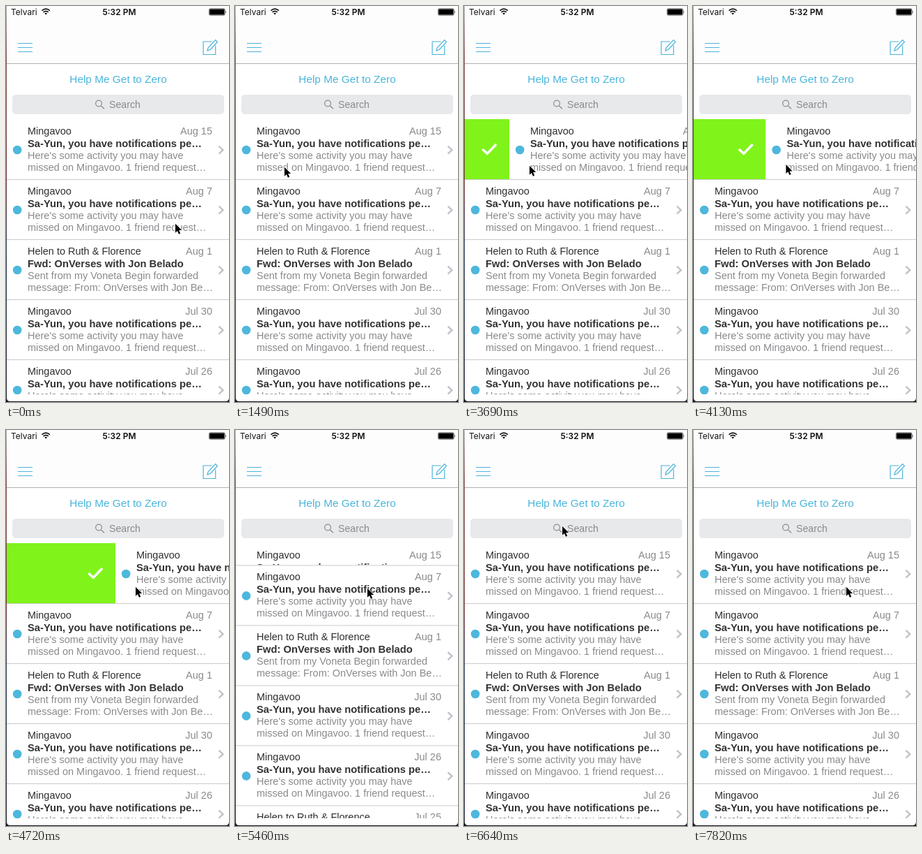
These frames come from a looping animation (320 by 567 pixels, 8000 ms). An HTML page:

```html
<!DOCTYPE html>
<html lang="en">
<head>
<meta charset="utf-8">
<title>Inbox swipe</title>
<style>
  html, body { margin: 0; width: 100%; height: 100%; overflow: hidden; background: #fff; }
  svg { display: block; width: 100%; height: 100%; }
  text { font: 14.5px "Liberation Sans", Arial, sans-serif; fill: #8a8a8e; }
  .status { font: 12px Inter, sans-serif; fill: #111; }
  .time { font-weight: 600; }
  .from { fill: #2e2e30; }
  .subject { font-size: 14.75px; font-weight: bold; fill: #333; }
  .help { font-size: 15.4px; fill: #4ab5da; }
  .line { fill: none; stroke: #4ab5da; stroke-width: 1.2; }
</style>
</head>
<body>
<svg viewBox="0 0 320 567" preserveAspectRatio="none">
  <defs>
    <linearGradient id="edge" x1="0" y1="0" x2="0" y2="1">
      <stop offset="0" stop-color="#a9adb5"/>
      <stop offset=".13" stop-color="#7c4a48"/>
      <stop offset=".45" stop-color="#6b3034"/>
      <stop offset=".6" stop-color="#26344e"/>
      <stop offset="1" stop-color="#10151f"/>
    </linearGradient>
    <clipPath id="listArea"><rect x="1" y="162" width="319" height="394"/></clipPath>
  </defs>

  <rect width="320" height="567" fill="url(#edge)"/>
  <path d="M1 0H320V561Q320 566 315 566H6Q1 566 1 561Z" fill="#fff"/>
  <rect x="1" width="319" height="82" fill="#fdfdfd"/>
  <rect x="1" y="82" width="319" height="1" fill="#b0b0b2"/>

  <!-- status bar -->
  <text class="status" x="7" y="12.5">Telvari</text>
  <g fill="none" stroke="#111" stroke-width="1.7">
    <path d="M51.5 6.6Q57.2 1.6 62.9 6.6M53.6 8.9Q57.2 5.7 60.8 8.9"/>
    <path d="M57.2 12.6L55.3 10.5Q57.2 9 59.1 10.5Z" fill="#111" stroke="none"/>
  </g>
  <text class="status time" x="162.5" y="12.5" text-anchor="middle">5:32 PM</text>
  <rect x="291.4" y="3.8" width="22.8" height="9.4" rx="1.8" fill="none" stroke="#000" stroke-width=".6"/>
  <rect x="292.2" y="4.6" width="21.2" height="7.8" rx="1" fill="#000"/>
  <path d="M315 7Q316.6 8.5 315 10Z" fill="#000"/>

  <!-- navigation -->
  <path class="line" style="stroke-width:1" d="M17 53.5H38M17 59.5H38M17 65.5H38"/>
  <path class="line" d="M295.5 51H283.1V69.5H300.7V56.5"/>
  <path class="line" d="M289 64L290.1 59.8L300.7 48.7L303.5 51.5L293.1 62.5Z"/>
  <text class="help" x="161" y="110" text-anchor="middle">Help Me Get to Zero</text>
  <rect x="9" y="127" width="304" height="28" rx="5" fill="#e8e9eb"/>
  <path d="M137.5 139.5a4.4 4.4 0 1 1-8.8 0a4.4 4.4 0 1 1 8.8 0M136.3 142.8L141 147.2"
        fill="none" stroke="#8a8a8e" stroke-width="1.2"/>
  <text x="148" y="146" style="font-size:14.2px">Search</text>

  <g clip-path="url(#listArea)" id="list"></g>

  <path id="cursor" d="M1 .8V13.8L3.9 11L6 15.7L8.2 14.7L6.2 10.1H10.2Z"
        fill="#000" stroke="#fff" stroke-width="1.6" paint-order="stroke" stroke-linejoin="round"/>
</svg>

<script>
  const LOOP = 8000, START = 900, STEP = 146.8;
  const ROW = 86, TOP = 162, DRAG_X = 29;

  const notice = ["Mingavoo", "Sa-Yun, you have notifications pe…",
    "Here's some activity you may have", "missed on Mingavoo. 1 friend request…"];
  const forward = ["Helen to Ruth & Florence", "Fwd: OnVerses with Jon Belado",
    "Sent from my Voneta Begin forwarded", "message: From: OnVerses with Jon Be…"];
  const mails = [
    ["Aug 15", notice], ["Aug 7", notice], ["Aug 1", forward],
    ["Jul 30", notice], ["Jul 26", notice], ["Jul 25", forward]
  ];

  // [step, x, y]
  const path = [
    [-1, 242, 311], [2, 76, 229], [3, 76, 229], [4, 70, 230], [6, 16, 233],
    [7, 16, 233], [8, 17, 233], [11, 17, 233], [19, 93, 228], [26, 185, 224],
    [27, 190, 224], [29, 191, 226], [31, 189, 226], [35, 169, 105],
    [36, 168.5, 105], [37, 168.5, 105], [45, 55, 233], [47, 219, 224]
  ];
  // [step, height removed from the first row]
  const collapse = [[29, 0], [30, 4], [31, 54.6], [32, ROW], [37, ROW], [38, 0]];

  const escape = s => s.replace(/&/g, "&amp;");

  function rowMarkup([date, [from, subject, line1, line2]], i) {
    const swipe = i ? "" : `<g id="swipe">
      <rect id="green" width="0" height="${ROW}" fill="#80f31a"/>
      <path id="check" d="M-37.6 43L-30.7 49.4L-17.8 36" fill="none" stroke="#fff" stroke-width="3.5"/></g>`;
    return `<g class="row">
      <rect width="320" height="${ROW}" fill="#fff"/>${swipe}
      <g class="mail">
        <rect x="1" width="319" height="${ROW}" fill="#fff"/>
        <circle cx="16.2" cy="44" r="6.3" fill="#4db7dc"/>
        <text class="from" x="31" y="22">${escape(from)}</text>
        <text x="296" y="22" text-anchor="end">${date}</text>
        <text class="subject" x="31" y="40">${subject}</text>
        <text x="31" y="57">${line1}</text>
        <text x="31" y="74">${line2}</text>
        <path d="M305.5 38.7L311.3 44.2L305.5 49.7" fill="none" stroke="#c3c3c7" stroke-width="2.4"/>
      </g>
      ${i ? '<rect width="320" height="1" fill="#cbcbce"/>' : ""}
    </g>`;
  }

  const $ = id => document.getElementById(id);
  $("list").innerHTML = mails.map(rowMarkup).join("");
  const rows = [...document.querySelectorAll(".row")];
  const firstMail = rows[0].querySelector(".mail");
  const move = (el, x, y) => el.setAttribute("transform", `translate(${x} ${y})`);

  function at(keys, k, col = 1) {
    const n = keys.findIndex(key => key[0] >= k);
    if (n < 0) return keys[keys.length - 1][col];
    if (n === 0) return keys[0][col];
    const a = keys[n - 1], b = keys[n];
    return a[col] + (b[col] - a[col]) * (k - a[0]) / (b[0] - a[0]);
  }

  function swipeOffset(k, x) {
    if (k < 11 || k > 29) return 0;
    if (k > 27) return k === 28 ? 215 : 320;
    return Math.max(0, x - DRAG_X);
  }

  function draw(t) {
    const k = Math.min(47, Math.max(-1, Math.floor((t - START) / STEP)));
    const x = at(path, k, 1), y = at(path, k, 2);
    const dx = swipeOffset(k, x), shift = at(collapse, k);

    rows.forEach((row, i) => move(row, 0, TOP + ROW * i - (i ? shift : 0)));
    move(firstMail, dx, 0);
    $("green").setAttribute("width", dx ? dx + 1 : 0);
    move($("check"), Math.max(dx, 54), 0);
    $("check").setAttribute("opacity", Math.min(1, dx / 54));
    move($("cursor"), x, y);
  }

  function tick(now) {
    draw(now % LOOP);
    requestAnimationFrame(tick);
  }
  draw(0);
  requestAnimationFrame(tick);
</script>
</body>
</html>
```
